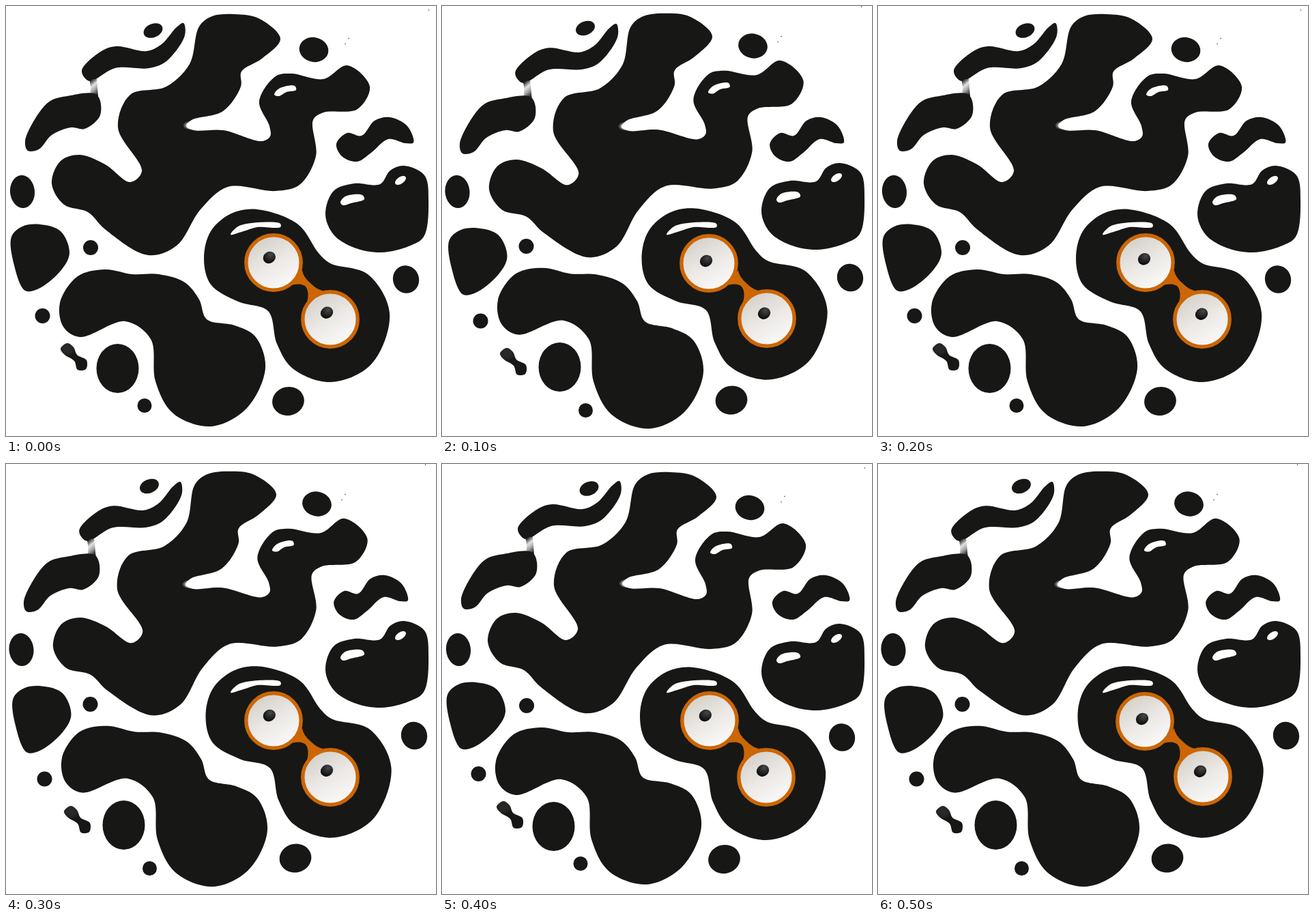
Animation of 630 by 630 pixels, one loop 0.6 s. Source, as an HTML page:

```html
<!DOCTYPE html>
<html lang="en">
<head>
<meta charset="utf-8">
<title>Ink blobs with glasses</title>
<style>
  html, body { margin: 0; width: 100%; height: 100%; overflow: hidden; background: #fff; }
  svg { display: block; width: 100vw; height: 100vh; }
  .ink { transform-box: fill-box; transform-origin: center; fill: #171716; }
</style>
</head>
<body>
<svg id="stage" viewBox="0 0 630 630">
  <defs>
    <linearGradient id="lens" x1="0.25" y1="0.05" x2="0.75" y2="0.95">
      <stop offset="0" stop-color="#d5d0c9"/>
      <stop offset="0.5" stop-color="#ebe8e5"/>
      <stop offset="1" stop-color="#fbfaf9"/>
    </linearGradient>
    <radialGradient id="pupil" cx="0.7" cy="0.35" r="0.75">
      <stop offset="0" stop-color="#484848"/>
      <stop offset="1" stop-color="#080808"/>
    </radialGradient>
    <linearGradient id="neck" x1="0.3" y1="0" x2="0.7" y2="1">
      <stop offset="0" stop-color="#171716"/>
      <stop offset="0.35" stop-color="#e2e2e2"/>
      <stop offset="0.6" stop-color="#aaa"/>
      <stop offset="1" stop-color="#171716"/>
    </linearGradient>
    <radialGradient id="glow">
      <stop offset="0.3" stop-color="#fff"/>
      <stop offset="1" stop-color="#fff" stop-opacity="0"/>
    </radialGradient>
    <radialGradient id="haze">
      <stop offset="0" stop-color="#444"/>
      <stop offset="1" stop-color="#999" stop-opacity="0"/>
    </radialGradient>
  </defs>
</svg>
<script>
const STEP = 100, STEPS = 6, ORANGE = '#cc6605';
const stage = document.getElementById('stage');
const swaying = [];

function add(parent, tag, attrs) {
  const el = document.createElementNS('http://www.w3.org/2000/svg', tag);
  for (const key in attrs) el.setAttribute(key, attrs[key]);
  return parent.appendChild(el);
}

// Centripetal Catmull-Rom: closed curve through "x,y x,y ..."
function smooth(text) {
  const pts = text.trim().split(/\s+/).map(p => p.split(',').map(Number));
  const n = pts.length, at = i => pts[(i + n) % n];
  const gap = (p, q) => Math.sqrt(Math.hypot(p[0] - q[0], p[1] - q[1]));
  const handle = (a, b, c) => {
    const s = gap(a, b), t = gap(b, c);
    return b.map((v, k) =>
      ((s * s * c[k] - t * t * a[k] + (2 * s * s + 3 * s * t + t * t) * v) / (3 * s * (s + t))).toFixed(1));
  };
  let d = 'M' + pts[0];
  for (let i = 0; i < n; i++) {
    const [a, b, c, e] = [at(i - 1), at(i), at(i + 1), at(i + 2)];
    d += `C${handle(a, b, c)} ${handle(e, c, b)} ${c}`;
  }
  return d + 'Z';
}

// Ink that takes the given transform on every other step
function ink(move) {
  const g = add(stage, 'g', { class: 'ink' });
  swaying.push({ g, move });
  return g;
}

function blob(move, text) {
  const g = ink(move);
  add(g, 'path', { d: smooth(text) });
  return g;
}

const shine = (parent, text) => add(parent, 'path', { d: smooth(text), fill: '#fff' });

const oval = (parent, cx, cy, rx, ry, turn = 0, attrs = {}) =>
  add(parent, 'ellipse', { cx, cy, rx, ry, transform: `rotate(${turn} ${cx} ${cy})`, ...attrs });

const drop = (dx, dy, ...shape) => oval(ink(`translate(${dx}px, ${dy}px)`), ...shape);

const main = blob('translate(-0.8px, 0px) rotate(-2.1deg)', `
  335,12 370,18 402,48 375,77 345,96 344,118 318,154 272,167 264,176 275,182 318,182 375,198
  387,191 386,176 371,140 395,103 418,99 465,107 500,87 533,118 515,151 465,156 450,167
  454,220 430,262 395,271 325,265 285,298 250,351 208,365 145,327 120,302 85,291 67,260 80,227
  108,218 145,232 182,258 199,242 164,178 182,130 235,118 269,85 283,30 302,15`);
oval(main, 272, 175, 13, 7, 0, { fill: 'url(#glow)' });
shine(main, '393,130 400,121 423,117 425,123 411,126 400,132');

const ribbon = blob('translate(-4px, 2px) rotate(-0.7deg)', `
  260,25 262,43 235,81 210,91 160,91 122,110 111,95 140,66 162,59 206,66 228,56 250,31`);
add(ribbon, 'path', { d: 'M122 107H133Q134 120 135 133H122Q126 122 122 107Z', fill: 'url(#neck)' });

blob('translate(-2px, 4px)', `
  133,130 138,160 115,180 95,178 67,189 48,210 32,212 28,198 48,157 65,139 90,132`);
blob('translate(2.5px, 5.5px)', '50,320 80,330 93,362 80,388 46,415 28,417 12,380 8,338 24,323');

blob('translate(3px, 0.7px) skewY(2deg)', `
  145,386 185,393 224,393 262,405 283,430 294,459 335,468 365,484 380,530 352,590 300,616
  245,597 219,550 212,488 175,462 108,485 84,470 79,435 105,396`);

blob('translate(2.5px, -2.5px) skewY(-1.1deg)', `
  368,298 428,320 458,362 475,377 530,393 562,450 535,525 475,551 420,531 397,495 384,447
  340,433 300,408 290,370 300,330 330,304`);
shine(stage, '329,335 340,323 370,317 402,319 402,324 368,324 348,330');

blob('translate(-6px, 0px) scaleX(0.96)', `
  562,163 588,176 597,200 585,201 560,195 535,215 514,228 492,220 484,202 500,186 521,190 540,168`);

const heart = blob('translate(0px, -4px)', `
  583,234 613,248 619,285 612,338 590,352 550,361 510,354 480,335 468,305 480,271 510,260
  548,261 563,241`);
shine(heart, '490,288 497,279 522,277 525,283 505,289 494,292');
oval(heart, 578, 255.5, 9, 5, -35, { fill: '#fff' });

const bone = blob('translate(5px, 7px)', '80,502 90,494 99,500 104,511 118,519 117,532 105,533 100,520 86,511');
oval(bone, 90, 502, 13, 11, 0, { fill: 'url(#haze)', opacity: 0.35 });

drop(-5.5, -3.5, 215.5, 36, 14.5, 10, -22);
drop(4.5, -5.5, 451, 64, 21.5, 18, 12);
drop(-1.5, 0, 24, 272, 18, 24, -5);
drop(-0.5, -2, 124, 354, 11, 11);
drop(3, 7.5, 53.5, 454, 11, 11);
drop(9, -2, 163.5, 531, 31, 36);
drop(7.5, 7, 203, 585.5, 10.5, 10.5);
drop(10.5, -1.5, 413.5, 579, 23.5, 21, -12);
drop(12, -2.5, 586, 400.5, 19, 20.5, -20);
drop(-5, -5, 619.5, 6, 0.7, 0.7);
drop(-5, -3, 502, 47.5, 0.7, 0.7);
drop(-5, -3, 497, 55.5, 0.7, 0.7);

add(stage, 'path', {
  d: 'M434 387Q435 397 447 407Q455 415 464 417L441 435Q445 418 439 411Q433 405 417 409Z',
  fill: ORANGE
});
const lenses = [0, 1].map(() => add(stage, 'circle', {
  r: 40.2, fill: 'url(#lens)', stroke: ORANGE, 'stroke-width': 5.4
}));
const pupils = [0, 1].map(() => add(stage, 'ellipse', { rx: 9.4, ry: 8.4, fill: 'url(#pupil)' }));

const centers = [[392, 376], [475, 459]];
const left = [[385.8, 368.5], [470, 449.3]];
const down = [[387, 373.5], [472, 450.3]];
const right = [[390, 370.7], [474, 451.2]];
const gaze = [left, down, right, left, left, down];

function render(ms) {
  const step = Math.floor(ms / STEP) % STEPS;
  for (const { g, move } of swaying) g.style.transform = step % 2 ? move : 'none';
  const look = gaze[step];
  const spread = look === down ? 1 : 0;
  centers.forEach(([x, y], i) => {
    const push = i ? spread : -spread;
    lenses[i].setAttribute('cx', x + push);
    lenses[i].setAttribute('cy', y - push);
    pupils[i].setAttribute('transform', `translate(${look[i]}) rotate(-30)`);
  });
}

let start;
function tick(now) {
  if (start === undefined) start = now;
  render(Math.max(0, now - start));
  requestAnimationFrame(tick);
}
render(0);
requestAnimationFrame(tick);
</script>
</body>
</html>
```
